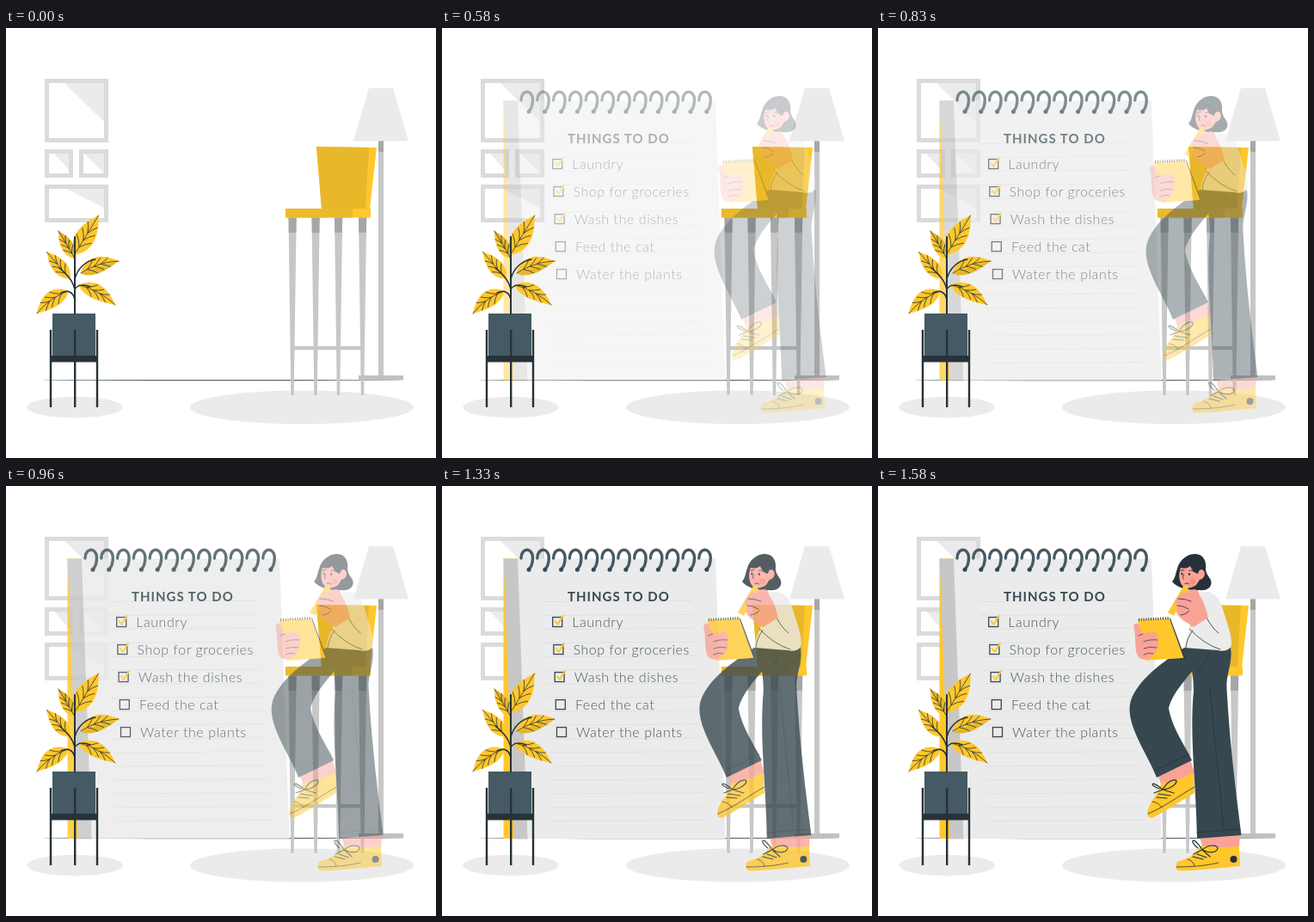
An HTML page that plays this animation: 500 by 500 pixels, repeating every 1620 ms.

```html
<!DOCTYPE html>
<html lang="en">
<head>
<meta charset="utf-8">
<title>Things to do</title>
<style>
  html, body { margin: 0; width: 100%; height: 100%; overflow: hidden; background: #fff; }
  svg { display: block; width: 100%; height: 100%; }
  .ink { fill: none; stroke: #263238; stroke-linecap: round; stroke-linejoin: round; }
  .skin { fill: #f9a397; }
  .title { font: 700 15px Lato, sans-serif; letter-spacing: 1px; fill: #37474f; }
  .item { font: 300 16px Lato, sans-serif; letter-spacing: .55px; fill: #455a64; }
</style>
</head>
<body>
<svg viewBox="0 0 500 500">
  <g id="frames"></g>
  <ellipse cx="80" cy="441" rx="55.5" ry="12.3" fill="#ebebeb"/>
  <ellipse cx="344" cy="441" rx="130" ry="19.5" fill="#ebebeb"/>
  <ellipse cx="251" cy="409.6" rx="209" ry=".6" fill="#5b676d"/>

  <g id="lamp">
    <path d="M433 131h6v274h-6z" fill="#c7c7c7"/>
    <path d="M433 131h6v13h-6z" fill="#a6a6a6"/>
    <path d="M422 70h28l18 61.500h-64z" fill="#ebebeb"/>
  </g>
  <g id="chair">
    <path d="M334 370h80v4.300h-80z" fill="#c7c7c7"/>
    <g id="legs"></g>
    <path d="M361 138L431 139 423 211H367z" fill="#ffc72c"/>
    <path d="M361 138L422 139 418 210H367z" fill="#e8b82a"/>
    <path d="M325 210h99v10.500h-99z" fill="#ffc72c"/>
    <path d="M325 210h78v10.500h-78z" fill="#ebba2b"/>
  </g>
  <path d="M410 404h52v5.500h-52z" fill="#c0c0c0"/>

  <g id="pad" opacity="0">
    <path d="M71.500 84.500H89L86 410H71.500z" fill="#ffc72c"/>
    <path d="M71.500 84.500H89L100 410.500H84z" fill="#c7c7c7"/>
    <path d="M88 84.500H318L329.500 410H99.500z" fill="#ebebeb"/>
    <g id="rules" stroke="#dedede" stroke-width=".8"></g>
    <g id="rings"></g>
    <text class="title" x="146" y="133.800">THINGS TO DO</text>
    <g id="list"></g>
  </g>

  <g id="plant">
    <path d="M54 332h50v49H54z" fill="#455a64"/>
    <g id="leaves"></g>
    <g class="ink" stroke-width="1.500">
      <path d="M80 332V243" stroke-width="2"/>
      <path d="M80 317C79 307 72 304 64 308M80 304C83 298 91 298 98 301M80 304C77 292 70 286 62 279M80 292C83 280 92 271 104 269"/>
    </g>
    <path d="M51 381h56v7.500H51zM50.800 351h2.400v90h-2.400zM79 351h2.400v90H79zM104.800 351h2.400v90h-2.400z" fill="#263238"/>
  </g>

  <g id="woman" opacity="0">
    <!-- raised foot -->
    <path class="skin" d="M326 337L363 317 368 334 348 350 329 347z"/>
    <path d="M367 333L368 357C352 366 338 376 321 385 316 387 312 385 313.500 378 315 370 321 363 325 357 327 352 328 348 330 345 343 344 356 339 367 333z" fill="#ffc72c"/>
    <path class="ink" stroke-width=".8" d="M314 381C332 374 350 360 368 350M319 367Q327 368 330 374"/>
    <path class="ink" stroke-width="1.200" d="M331 353C317 341 315 348 327 352M331 353C340 338 353 340 344 348 340 351 335 353 331 353M331 353L321 357M331 353L344 357M326 358L340 360M324 362L336 363"/>
    <!-- standing foot -->
    <path class="skin" d="M374 407L421 404 420 421 378 424z"/>
    <path d="M420 419L421 442C396 444 374 447 350 447.500 346 447 346 440 348 437 357 434 366 431 371 424 373 420 376 418 379 418 394 421 408 420 420 419z" fill="#ffc72c"/>
    <circle cx="413.500" cy="434" r="4" fill="#263238"/>
    <path class="ink" stroke-width=".8" d="M347 443C372 443 388 440 396 438M360 434Q367 436 368 442"/>
    <path class="ink" stroke-width="1.200" d="M377 423C366 405 361 413 372 421M377 423C388 414 401 419 392 425 387 427 381 425 377 423M377 423L367 428M377 423L386 431M371 428L382 432M366 431L378 434"/>
    <!-- trousers -->
    <path d="M358 187L388 190 371 209C358 224 341 243 338 259 342 281 356 300 365 319L324 339C313 311 289 279 293 254 296 237 312 221 328 208 340 199 350 191 358 187z" fill="#37474f"/>
    <path d="M361 186L410 188C413 205 404 220 405.500 236 409 300 416 355 422.500 406L371 410C370 345 362 292 367 238 367 222 364 208 361 186z" fill="#37474f"/>
    <path class="ink" stroke-width=".7" d="M322 331L362 312M371 403L421 399M372 214Q382 206 385 194M386 235Q393 310 402 397"/>
    <!-- shirt -->
    <path d="M371 125C384 119 396 126 400 140 405 157 411 171 411 183 411 191 402 193 395 191L356 188C357 178 363 167 366 158z" fill="#ebebeb"/>
    <path class="ink" stroke-width=".8" d="M362 166Q379 184 398 190M382 153Q389 166 396 171M366 168Q359 177 358 188"/>
    <!-- head -->
    <path d="M342 111C346 107 346 101 348 96 351 85 360 79 369 79 380 80 382 89 381 97 382 105 388 107 387.500 113 387 119 381 122 374 121 362 122 348 119 342 111z" fill="#263238"/>
    <path class="skin" d="M352 95C349 103 350 111 354 116 358 120 365 119 370 115L374 109C381 108 382 98 376 97 372 98 373 101 372 102 367 101 365 97 363 93 360 96 355 96 352 95z"/>
    <circle cx="366" cy="111" r="3.200" fill="#fa8a7c"/>
    <path class="ink" stroke-width=".9" d="M352 98.500L356 97.500M362 98.500Q365 96.500 367 99.500M355.500 103Q353.500 107 355.500 108M357 113.500Q359 112 362 114"/>
    <g fill="#263238"><ellipse cx="353.500" cy="102" rx="1" ry="1.500"/><ellipse cx="362" cy="102.500" rx="1.100" ry="1.600"/></g>
    <!-- pencil hand -->
    <path d="M356 115L361 118 344 151 337 147z" fill="#ffc72c"/>
    <path class="skin" d="M348 130C351 125 356 122 363 121 370 119 374 122 373 126 380 135 382 146 384 153L367 164C359 158 351 155 348 149 345 145 350 142 347 139 344 136 345 132 348 130z"/>
    <path class="ink" stroke-width=".8" d="M349 131Q357 131 364 134M348 139Q355 139 361 143M352 150Q359 149 362 145"/>
    <path d="M356 115L361 118 358 125 353 122z" fill="#ffc72c"/>
    <!-- small notebook -->
    <path d="M336 154L340 154 357 200 352 202z" fill="#263238"/>
    <path d="M302 156L339 154 355.500 200 311 203z" fill="#ffc72c"/>
    <path class="ink" stroke-width="3" stroke-dasharray="1 1.800" style="stroke-linecap:butt" d="M303 155.500L338 153.500"/>
    <path class="skin" d="M298 167C295 159 303 157 304 164L308 172C316 169 325 169 325.500 174 326 177 325 179 325 180 327 184 326 187 324 189 325 193 322 195 320 195 318 201 309 204 303 199 298 193 300 177 298 167z"/>
    <path class="ink" stroke-width=".7" d="M308 172L303 174M325 179Q316 178 309 181M324 188Q316 186 309 189M320 195Q315 193 309 196"/>
  </g>
</svg>
<script>
const $ = id => document.getElementById(id);
const fill = (id, html) => { $(id).innerHTML = html; };
const times = (n, f) => Array.from({ length: n }, (_, i) => f(i)).join('');

// Wall pictures: x, y, width, height, corner of the glare
const pictures = [[45, 59, 74, 74, 23, 50], [45, 141, 33, 33, 11, 24], [85, 141, 34, 33, 6, 28], [45, 182, 74, 44, 25, 27]];
fill('frames', pictures.map(([x, y, w, h, gx, gy]) => `
  <rect x="${x + 2.5}" y="${y + 2.5}" width="${w - 5}" height="${h - 5}" fill="#fff" stroke="#dbdbdb" stroke-width="5"/>
  <path d="M${x + gx} ${y + 5}H${x + w - 5}V${y + gy}z" fill="#ebebeb"/>`).join(''));

fill('legs', [328.5, 355.5, 382, 410].map((x, i) => {
  const foot = [333, 360, 386.5, 414.5][i];
  return `<path d="M${x} 220h9.200L${foot + 1.7} 427h-3.400z" fill="#c7c7c7"/>
    <path d="M${x} 220.500h9.200l-.3 17.500h-8.600z" fill="#a6a6a6"/>`;
}).join(''));

fill('rules', times(17, i => {
  const y = 134 + i * 15.95;
  return `<path d="M${118 + i * .6} ${y + .6}L${291 + i * 1.1} ${y - .6}"/>`;
}));

fill('rings', times(12, i => `<g transform="translate(${i * 18.8})">
  <path class="ink" style="stroke:#455a64" stroke-width="3.400" d="M92 84C92 71.500 105 71 105.500 83 105.500 90 104 94 101 97"/>
  <circle cx="101" cy="97.300" r="2.500" fill="#37474f"/></g>`));

const tasks = ['Laundry', 'Shop for groceries', 'Wash the dishes', 'Feed the cat', 'Water the plants'];
fill('list', tasks.map((task, i) => {
  const x = 128.7 + i * 1.2, y = 152.6 + i * 32;
  const tick = i < 3 ? `<path d="M${x + 2.4} ${y + 4}l3.500 4.300 6.500-10.500" fill="none" stroke="#ffc72c" stroke-width="2"/>` : '';
  return `<rect x="${x}" y="${y}" width="11" height="11" fill="none" stroke="#37474f" stroke-width="1.300"/>${tick}
    <text class="item" x="${x + 22.6}" y="${y + 11.2}">${task}</text>`;
}).join(''));

// A leaf from base to tip; w is the bulge on each side, bend arches the midrib
function leaf(bx, by, tx, ty, w, bend, shade) {
  const dx = tx - bx, dy = ty - by, len = Math.hypot(dx, dy);
  const at = (u, v) => {
    const k = v + 3 * bend * u * (1 - u);
    return `${(bx + dx * u - dy / len * k).toFixed(1)} ${(by + dy * u + dx / len * k).toFixed(1)}`;
  };
  const line = (n, f) => 'M' + Array.from({ length: n + 1 }, (_, i) => at(i / n, f(i / n))).join('L');
  const edge = s => line(16, u => s * w * 2.7 * u ** .8 * (1 - u) ** 1.1);
  const rib = line(16, () => 0);
  const veins = times(3, i => {
    const u = .18 + i * .18, v = w * (.68 - i * .12);
    return `M${at(u + .22, -v)}Q${at(u + .14, -v * .4)} ${at(u, 0)}Q${at(u + .14, v * .4)} ${at(u + .22, v)}`;
  });
  const half = (s, c) => `<path d="${edge(s)}${rib.replace('M', 'M')}" fill="${c}" stroke="${c}" stroke-width=".4"/>`;
  return half(1, shade ? '#e5b62a' : '#ffc72c') + half(-1, '#ffc72c')
    + `<path class="ink" stroke-width=".8" d="${rib}${veins}"/>`;
}
fill('leaves', [
  [80, 263, 107.5, 218, 15, 0],
  [80, 268, 61, 236, 9.5, 0, true],
  [74, 291, 47.5, 260.5, 11, 0],
  [87, 285, 131, 271, 12.5, -4, true],
  [72, 306, 36, 332, 12.5, 4],
  [85, 299, 127, 322, 11.5, -4]
].map(a => leaf(...a)).join(''));

const LOOP = 1620, STEPS = 39, PAD_END = 26, SLIDE = 32;
const ease = u => Math.min(1, u) ** 1.4;
const start = performance.now();

function draw(now) {
  const t = Math.max(0, now - start) % LOOP;
  const k = Math.min(STEPS - 1, Math.floor((t + 4) * STEPS / LOOP));
  const p = ease(k / (STEPS - 1));
  $('pad').setAttribute('opacity', ease(k / PAD_END));
  $('woman').setAttribute('opacity', p);
  $('woman').setAttribute('transform', `translate(${SLIDE * (1 - p)})`);
  requestAnimationFrame(draw);
}
draw(start);
</script>
</body>
</html>
```
